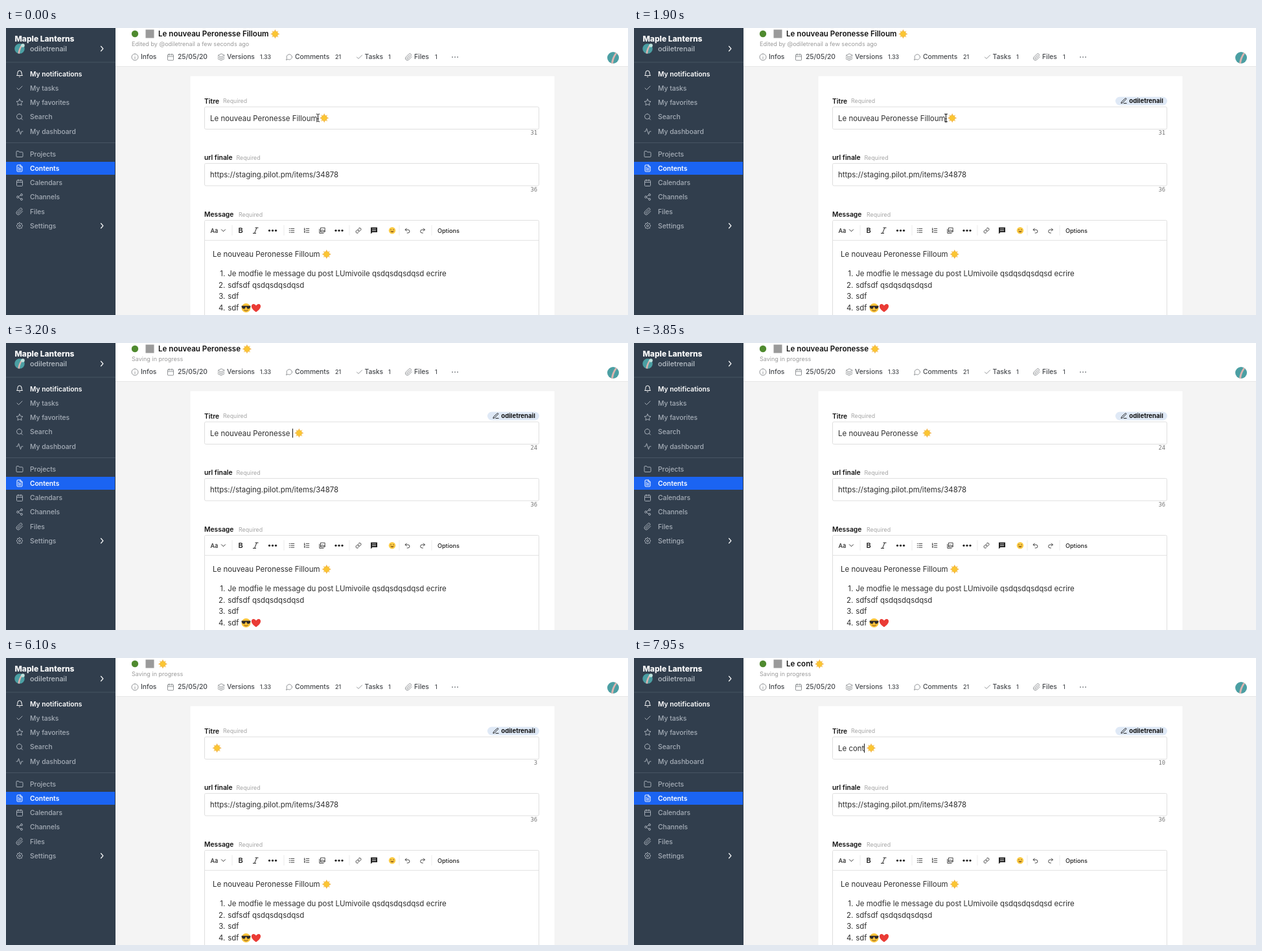
Recreate the animation shown at these times as an HTML page. Size 960 px wide and 444 px high, loop 8000 ms.

```html
<!DOCTYPE html>
<html lang="fr">
<head>
<meta charset="utf-8">
<title>Content editor</title>
<style>
  html, body { margin: 0; width: 100%; height: 100%; overflow: hidden; background: #f4f4f4; }
  svg { display: block; }
  text { font-family: Inter, "Open Sans", sans-serif; white-space: pre; }
  .mono { font-family: "DejaVu Sans Mono", monospace; }
</style>
</head>
<body>
<svg id="stage" width="960" height="444" viewBox="0 0 960 444"></svg>
<script>
const LOOP = 8000;
const USER = 'odiletrenail';
const TITLE = 'Le nouveau Peronesse Filloum';
const RETYPED = 'Le cont';

// Icons live on a 24-unit grid.
const ICONS = {
  bell: 'M18 8A6 6 0 006 8c0 7-3 9-3 9h18s-3-2-3-9M13.7 21a2 2 0 01-3.4 0',
  check: 'M20 6L9 17l-5-5',
  star: 'M12 2l3.1 6.3 6.9 1-5 4.9 1.2 6.8L12 17.8 5.8 21 7 14.2 2 9.3l6.9-1z',
  search: 'M11 3a8 8 0 100 16 8 8 0 000-16M21 21l-4.3-4.3',
  pulse: 'M22 12h-4l-3 9L9 3l-3 9H2',
  folder: 'M22 19a2 2 0 01-2 2H4a2 2 0 01-2-2V5a2 2 0 012-2h5l2 3h9a2 2 0 012 2z',
  page: 'M14 2H6a2 2 0 00-2 2v16a2 2 0 002 2h12a2 2 0 002-2V8zM14 2v6h6M16 13H8M16 17H8M10 9H8',
  calendar: 'M5 4h14a2 2 0 012 2v14a2 2 0 01-2 2H5a2 2 0 01-2-2V6a2 2 0 012-2zM16 2v4M8 2v4M3 10h18',
  share: 'M18 2a3 3 0 100 6 3 3 0 000-6M6 9a3 3 0 100 6 3 3 0 000-6M18 16a3 3 0 100 6 3 3 0 000-6M8.6 13.5l6.8 4M15.4 6.5l-6.8 4',
  clip: 'M21.4 11l-9.2 9.2a6 6 0 01-8.5-8.5l9.2-9.2a4 4 0 015.7 5.7l-9.2 9.2a2 2 0 01-2.8-2.8l8.5-8.5',
  gear: 'M12 9a3 3 0 100 6 3 3 0 000-6M12 2l2.5 3 4-.5v4L22 12l-3.5 3.5v4l-4-.5L12 22l-2.5-3-4 .5v-4L2 12l3.5-3.5v-4l4 .5z',
  info: 'M12 2a10 10 0 100 20 10 10 0 000-20M12 17v-5M12 8v.1',
  layers: 'M12 2L2 7l10 5 10-5zM2 17l10 5 10-5M2 12l10 5 10-5',
  comment: 'M21 11.5a8.4 8.4 0 01-12.5 7.4L3 21l1.9-5.7A8.4 8.4 0 1121 11.5z',
  pencil: 'M12 20h9M16.5 3.5a2.1 2.1 0 013 3L7 19l-4 1 1-4z',
  link: 'M10 13a5 5 0 007.5.5l3-3a5 5 0 00-7-7l-1.8 1.7M14 11a5 5 0 00-7.5-.5l-3 3a5 5 0 007 7l1.8-1.7',
  undo: 'M9 14L4 9l5-5M4 9h10a6 6 0 010 12h-3',
  redo: 'M15 14l5-5-5-5M20 9H10a6 6 0 000 12h3',
  bullets: 'M9 5h12M9 12h12M9 19h12M3 5h2M3 12h2M3 19h2',
  numbers: 'M10 5h11M10 12h11M10 19h11M4 3v6M3 9h3M3 14h3l-3 5h3',
  image: 'M7 2h15v15H7zM2 7v15h15M7 15l5-6 4 5 3-3 3 4',
  right: 'M8 2l9 10-9 10',
  down: 'M4 8l8 8 8-8'
};

const text = (x, y, s, size, fill, weight = 400, more = '') =>
  `<text x="${x}" y="${y}" font-size="${size}" fill="${fill}" font-weight="${weight}" ${more}>${s}</text>`;
const rect = (x, y, w, h, fill, more = '') =>
  `<rect x="${x}" y="${y}" width="${w}" height="${h}" fill="${fill}" ${more}/>`;
const circle = (x, y, r, fill, more = '') =>
  `<circle cx="${x}" cy="${y}" r="${r}" fill="${fill}" ${more}/>`;
const icon = (name, x, y, color, size = 12, weight = 2) =>
  `<path d="${ICONS[name]}" transform="translate(${x - size / 2} ${y - size / 2}) scale(${size / 24})"
    fill="none" stroke="${color}" stroke-width="${weight}" stroke-linecap="round" stroke-linejoin="round"/>`;
const dots = (x, y, gap, r, fill) => [-gap, 0, gap].map(d => circle(x + d, y, r, fill)).join('');
const field = (y, h) => rect(306.5, y, 516, h, '#fff', 'stroke="#dfdfdf" rx="2"');
const use = (href, x, y, id = '') =>
  `<use href="#${href}" transform="translate(${x} ${y})" ${id && `id="${id}"`}/>`;

function symbols() {
  const rays = Array.from({ length: 8 }, (_, i) =>
    `<path d="M-1.5 -4L0 -7.2L1.5 -4z" transform="rotate(${i * 45})" fill="${i % 2 ? '#f8d27a' : '#f3b64f'}"/>`).join('');
  return `<defs>
    <g id="sun">${rays}${circle(0, 0, 4.2, '#fbc632', 'stroke="#f2b03a" stroke-width=".6"')}</g>
    <g id="smile">${circle(0, 0, 5.2, '#fbcb45')}
      <path d="M-3 -1Q-2 -2.4 -1 -1M1 -1Q2 -2.4 3 -1" fill="none" stroke="#7a4f14" stroke-width=".8"/>
      <path d="M-3 1Q0 4.8 3 1z" fill="#8a5a1c"/></g>
    <g id="cool">${circle(0, 0, 7, '#fbc43a')}
      <path d="M-6.9 -3.2H6.9V-1.5Q5.8 1.6 3.2 1.4Q1 1.2 .7 -1.5H-.7Q-1 1.2-3.2 1.4Q-5.8 1.6-6.9 -1.5z" fill="#2e2a2b"/>
      <path d="M-3 3.4Q0 5.8 3 3.4" fill="none" stroke="#80501a"/></g>
    <path id="heart" d="M0 6.4C-10 .2-7.6-6-3.8-6Q-1.2-6 0-3.4Q1.2-6 3.8-6C7.6-6 10 .2 0 6.4z" fill="#ea3b35"/>
    <g id="avatar">${circle(0, 0, 9, '#4b9fa3')}
      <path d="M-3 8.4Q-2 0 3.8 -8L6 -6.6Q1 0 0 8.9z" fill="#dcb4b0"/></g>
  </defs>`;
}

function sidebar() {
  const muted = '#a6aeb8';
  const items = [
    ['bell', 'My notifications', 71], ['check', 'My tasks', 93], ['star', 'My favorites', 115],
    ['search', 'Search', 137.5], ['pulse', 'My dashboard', 160], ['folder', 'Projects', 195],
    ['page', 'Contents', 217], ['calendar', 'Calendars', 239.5], ['share', 'Channels', 261.5],
    ['clip', 'Files', 284], ['gear', 'Settings', 306]
  ].map(([glyph, label, y]) => {
    const strong = label === 'My notifications' || label === 'Contents';
    const color = strong ? '#fff' : muted;
    return icon(glyph, 21, y, color, 12) + text(37, y + 3.7, label, 10.3, color, strong ? 600 : 500);
  }).join('');
  return rect(0, 0, 169, 444, '#313e4d')
    + rect(0, 52.5, 169, 1, '#475463') + rect(0, 177, 169, 1, '#475463')
    + rect(0, 207, 168, 20, '#1b64f2')
    + text(13.5, 20.7, 'Maple Lanterns', 12, '#fff', 800)
    + `<use href="#avatar" transform="translate(21 32) scale(.86)"/>` + circle(26, 27, 2.8, '#bfe3dd')
    + text(37, 35.8, USER, 10.8, '#b9c0c8', 500)
    + icon('right', 148, 32, '#fff', 9, 3) + icon('right', 148, 306, '#fff', 9, 3)
    + items;
}

function header() {
  const ink = '#45484c', gray = '#85888c';
  const tabs = [
    ['info', 199, 'Infos', 208], ['calendar', 254, '25/05/20', 265],
    ['layers', 332, 'Versions', 341, '1.33', 392], ['comment', 437, 'Comments', 446, '21', 508],
    ['check', 545.5, 'Tasks', 553.5, '1', 590], ['clip', 621.5, 'Files', 630, '1', 662]
  ].map(([glyph, ix, label, x, count, cx]) =>
    icon(glyph, ix, 45, gray, 12, 1.8) + text(x, 48.4, label, 10.3, ink, 500)
    + (count ? text(cx, 48, count, 8.8, ink, 500) : '')).join('');
  return rect(169, 0, 791, 59, '#fff') + rect(169, 59, 791, 1, '#e6e6e6')
    + circle(199, 9, 5.2, '#4f8a2f')
    + rect(215.5, 2.5, 13, 13, '#9a9a9a')
    + text(235, 13.4, '', 11.6, '#111', 600, 'id="heading"') + use('sun', 0, 0, 'headingSun')
    + text(194, 28.2, '', 9.05, '#9b9b9b', 400, 'id="status"')
    + tabs + dots(693, 45, 4, 1, gray) + use('avatar', 937, 46);
}

function label(name, x, y) {
  return text(306, y, name, 10.3, '#111', 600) + text(x, y - .3, 'Required', 8.8, '#a5a5a5');
}

function toolbar() {
  const ink = '#222', y = 313.3;
  const glyphs = [['bullets', 441], ['numbers', 464], ['image', 488], ['link', 544], ['undo', 619.5], ['redo', 643]];
  return text(315.5, 316.7, 'Aa', 9.2, ink, 500) + icon('down', 335.5, y, ink, 9, 2.4)
    + text(358.5, 317.3, 'B', 11, ink, 600)
    + `<path d="M384.5 309h5M381 317.5h5M387 309L383.5 317.5" fill="none" stroke="${ink}"/>`
    + dots(411.5, y, 5, 1.6, ink) + dots(514, y, 5, 1.6, ink)
    + glyphs.map(([name, x]) => icon(name, x, y, ink, 10)).join('')
    + `<path d="M563 308.5h10v7.5h-7.5l-2.5 2.5z" fill="${ink}"/>
       <path d="M565 311h6M565 313.5h6" stroke="#fff" stroke-width=".8"/>`
    + use('smile', 596, y)
    + [348.5, 428.5, 529.5, 606.5, 656.5].map(x => rect(x, 305, 1, 16, '#ececec')).join('')
    + text(666, 316.7, 'Options', 9.1, ink, 500);
}

function form() {
  const ink = '#2f2f2f', size = 11.47;
  const lines = ['Je modfie le message du post LUmivoile qsdqsdqsdqsd ecrire', 'sdfsdf qsdqsdqsdqsd', 'sdf', 'sdf'];
  return rect(284, 74, 563, 380, '#fff', 'stroke="#ededed" stroke-width=".6"')
    + label('Titre', 335, 116.6) + label('url finale', 355.5, 204.4) + label('Message', 359, 292)
    + field(122, 34.5) + field(209.5, 34.5) + field(297.5, 160) + rect(307, 328, 515, 1, '#e4e4e4')
    + text(315, 143.5, '', size, ink, 400, 'id="value"') + use('sun', 0, 0, 'valueSun')
    + rect(0, 132.5, 1, 14, '#111', 'id="caret"')
    + text(820, 165, '', 8.8, '#777', 400, 'class="mono" text-anchor="end" id="count"')
    + text(315, 231.2, 'https://staging.pilot.pm/items/34878', size, ink)
    + text(820, 253, '36', 8.8, '#777', 400, 'class="mono" text-anchor="end"')
    + toolbar()
    + text(319, 353.8, TITLE + ' ', size, ink, 400, 'id="message"') + use('sun', 0, 0, 'messageSun')
    + lines.map((s, i) => text(338.3, 383.6 + i * 17.9, i + 1 + '.', size, ink, 400, 'text-anchor="end"')
      + text(342.3, 383.6 + i * 17.9, s, size, ink)).join('')
    + use('cool', 370.5, 433) + use('heart', 386, 433)
    + `<g id="badge">${rect(743, 106.5, 80, 13, '#dfe9f6', 'rx="6.5"')}
       ${icon('pencil', 756, 112.8, '#111', 11)}${text(764.3, 116.3, USER, 9.6, '#111', 700)}</g>`;
}

const pointers = `
  <path id="arrow" d="M0 0V10.2L2.4 8L4 11.8L5.9 11L4.3 7.3H7.5z" fill="#111" stroke="#fff" stroke-width=".8"/>
  <path id="beam" d="M-2.5 -6Q0 -6 0 -4.5Q0 -6 2.5 -6M0 -4.5V4.5M-2.5 6Q0 6 0 4.5Q0 6 2.5 6M-1.2 1.5H1.2"
    fill="none" stroke="#111"/>`;

document.getElementById('stage').innerHTML =
  symbols() + rect(0, 0, 960, 444, '#f4f4f4') + header() + form() + sidebar() + pointers;

const el = id => document.getElementById(id);
const show = (id, on) => el(id).setAttribute('visibility', on ? 'visible' : 'hidden');
const place = (id, x, y) => el(id).setAttribute('transform', `translate(${x} ${y})`);
const setText = (id, s) => { el(id).textContent = s; return el(id).getComputedTextLength(); };

const FOCUS = 1650, FIRST_KEY = 2150;
// Letters go first, then whole words, then the new title is typed.
const edits = [
  [FOCUS, TITLE],
  ...[[FIRST_KEY, 27], [2400, 26], [2600, 25], [2750, 24], [2900, 23], [3050, 22], [3200, 21],
    [4000, 11], [4400, 3], [5500, 0]].map(([at, n]) => [at, TITLE.slice(0, n)]),
  ...[...RETYPED].map((_, i) => [6600 + i * 200, RETYPED.slice(0, i + 1)])
];

const ease = (t, from, to) => {
  const p = Math.min(1, Math.max(0, (t - from) / (to - from)));
  return p * p * (3 - 2 * p);
};

function draw(t) {
  const [editedAt, value] = edits.filter(([at]) => at <= t).pop() || edits[0];
  const focused = t >= FOCUS, editing = t >= FIRST_KEY;

  const spaced = setText('value', value + ' ');
  const typed = setText('value', value);
  place('valueSun', 322.4 + spaced, 139.3);
  el('caret').setAttribute('x', Math.round(315 + typed));
  show('caret', focused && (t - editedAt) % 1000 < 500);
  setText('count', value.length + 3);

  const title = value.trim();
  place('headingSun', 242 + setText('heading', title && title + ' '), 9.3);
  setText('status', editing ? 'Saving in progress' : `Edited by @${USER} a few seconds ago`);
  show('badge', t >= FOCUS + 150);

  const y = 139 - 21.5 * (ease(t, 700, 1000) - ease(t, 1250, 1550));
  place('beam', 481.5, y);
  place('arrow', 481, y);
  show('beam', !editing && y >= 122);
  show('arrow', !editing && y < 122);
}

function frame() {
  draw(performance.now() % LOOP);
  requestAnimationFrame(frame);
}
place('messageSun', 326 + el('message').getComputedTextLength(), 350);
frame();
</script>
</body>
</html>
```
